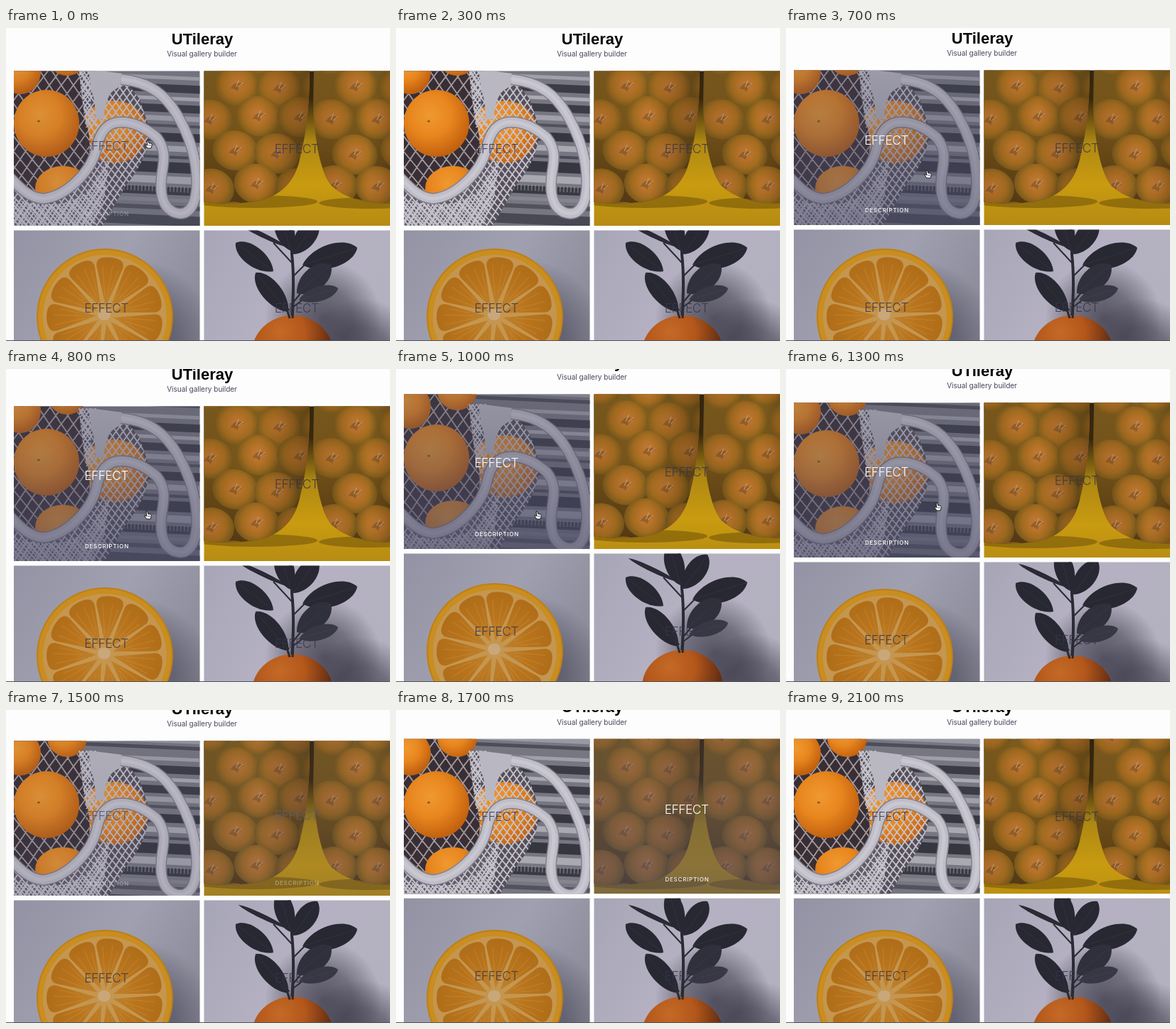
Write an HTML page with a canvas that moves like this. It is 540 px wide and 440 px high and loops after 2.2 s.

```html
<!DOCTYPE html>
<html lang="en">
<head>
<meta charset="utf-8">
<title>Visual gallery builder</title>
<style>
html, body { margin: 0; width: 100%; height: 100%; overflow: hidden; background: #fdfdfd; }
canvas { display: block; width: 540px; height: 440px; }
</style>
</head>
<body>
<canvas id="stage" width="540" height="440"></canvas>
<script>
const ctx = document.getElementById('stage').getContext('2d');
const LOOP = 2200, STEP = 100;
const W = 261.5, H = 217.5;

// Keyframe tracks: [time, value] pairs, linear in between.
const scroll = [[0, 0], [600, 0], [700, 1], [800, 8], [900, 18], [1000, 25], [1100, 23], [1200, 17], [1300, 13], [1500, 17], [1700, 19.7], [2200, 19.7]];
const drift = [[0, 0], [700, 0], [1000, -9], [1300, -1], [2200, -1]];
const hoverA = [[0, .28], [100, .1], [200, 0], [400, 0], [600, .65], [700, .85], [900, 1], [1300, .95], [1600, 0], [2200, 0]];
const hoverB = [[0, 0], [1400, 0], [1600, .7], [1700, .82], [2000, 0], [2200, 0]];
const handX = [[0, 200], [500, 199], [1000, 199], [1300, 213], [1500, 300]];
const handY = [[0, 163], [500, 180], [700, 205], [1000, 205], [1300, 193], [1500, 160]];

function at(track, t) {
  for (let i = 1; i < track.length; i++) {
    const [t0, a] = track[i - 1], [t1, b] = track[i];
    if (t <= t1) return a + (b - a) * (t - t0) / (t1 - t0);
  }
  return track[track.length - 1][1];
}

function random(seed) {
  return () => (seed = (seed * 16807) % 2147483647) / 2147483647;
}

function fill(d, color) {
  ctx.fillStyle = color;
  ctx.fill(new Path2D(d));
}

function stroke(d, color, width) {
  ctx.strokeStyle = color;
  ctx.lineWidth = width;
  ctx.stroke(new Path2D(d));
}

function oval(x, y, rx, ry, color, turn = 0) {
  ctx.fillStyle = color;
  ctx.beginPath();
  ctx.ellipse(x, y, rx, ry, turn, 0, 7);
  ctx.fill();
}

function blend(g, colors) {
  colors.forEach((c, i) => g.addColorStop(i / (colors.length - 1), c));
  return g;
}

function linear(x0, y0, x1, y1, ...colors) {
  return blend(ctx.createLinearGradient(x0, y0, x1, y1), colors);
}

function radial(x, y, r, ...colors) {
  return blend(ctx.createRadialGradient(x, y, 0, x, y, r), colors);
}

function shade(x, y, r, rgb, alpha) {
  oval(x, y, r, r, radial(x, y, r, `rgba(${rgb},${alpha})`, `rgba(${rgb},${alpha * .7})`, `rgba(${rgb},0)`));
}

function orange(x, y, rx, ry) {
  oval(x, y, rx, ry, radial(x - rx * .2, y - ry * .25, rx * 1.3, '#ef9930', '#e8861e', '#c1600f'));
}

function inside(d, draw) {
  ctx.save();
  ctx.clip(new Path2D(d));
  draw();
  ctx.restore();
}

function net(d, gap, color, width) {
  inside(d, () => {
    ctx.strokeStyle = color;
    ctx.lineWidth = width;
    ctx.beginPath();
    for (let x = -300; x < 560; x += gap) {
      ctx.moveTo(x, 20);
      ctx.quadraticCurveTo(x + 75, 150, x + 210, 290);
      ctx.moveTo(x, 20);
      ctx.quadraticCurveTo(x - 105, 150, x - 190, 290);
    }
    ctx.stroke();
  });
}

function bagPhoto() {
  ctx.fillStyle = '#777782';
  ctx.fillRect(0, 0, 280, 290);
  ctx.save();
  ctx.translate(200, 0);
  ctx.rotate(.045);
  const stripes = [[38, 8, '#9999a3'], [50, 5, '#4c4d58'], [66, 5, '#a0a0aa'], [78, 11, '#3a3b45'], [95, 5, '#aaaab4'],
    [106, 11, '#3a3b45'], [122, 7, '#a0a0aa'], [134, 4, '#50515c'], [146, 12, '#353640'], [164, 8, '#a9a9b2'],
    [178, 4, '#4a4b56'], [187, 15, '#353640'], [207, 10, '#a9a9b2'], [222, 11, '#383943'], [238, 5, '#85858f'],
    [248, 6, '#51525d'], [262, 14, '#484954']];
  for (const [y, h, c] of stripes) {
    ctx.fillStyle = c;
    ctx.fillRect(-100, y, 220, h);
  }
  ctx.fillStyle = 'rgba(195,195,205,.35)';
  for (let x = -80; x < 100; x += 5) ctx.fillRect(x, 221, 2, 8);
  ctx.restore();

  const floor = 'M0 20H105L112 110L130 160L100 230L0 240Z';
  fill(floor, '#382e35');
  net(floor, 17, '#a59b9c', 1.8);
  orange(20, 62, 29, 31);
  orange(86, 40, 28, 27);
  orange(57, 134, 46, 47);
  oval(46, 131, 2, 1.5, '#8f5a16');
  orange(80, 225, 39, 31);

  const body = 'M102 58L160 64L188 100L202 142Q200 185 168 222L132 285H0V212Q55 255 100 222Q128 180 112 130Z';
  inside(body, () => {
    ctx.fillStyle = '#55505b';
    ctx.fillRect(0, 0, 280, 290);
    orange(152, 146, 47, 44);
    fill('M0 205Q60 250 112 215L142 178L132 285H0Z', 'rgba(100,94,108,.8)');
  });
  net(body, 10, '#c6c3cc', 1.8);
  net('M102 58L130 58L119 105L130 138L112 140ZM0 236Q70 262 112 232L146 180L138 240L120 285H0Z', 6, '#c4c2cb', 1.7);

  ctx.lineCap = 'butt';
  ctx.lineJoin = 'round';
  fill('M116 58L164 64Q178 72 170 80Q156 82 147 92Q138 106 138 128L126 128Q126 102 120 88Z', '#b9b7c1');
  const strap = 'M162 72C204 76 225 96 240 121C259 153 270 190 268 226C265 257 252 265 236 259C219 251 216 231 219 207C222 187 226 172 212 154C192 137 172 130 154 133C138 137 131 151 127 171C119 202 85 237 52 240C34 239 20 226 2 206';
  stroke(strap, '#827f8c', 16);
  stroke(strap, '#bfbdc7', 13);
  stroke(strap, '#c9c7d0', 5);
}

function pineapple(outline, seed, left, right) {
  const rnd = random(seed);
  inside(outline, () => {
    ctx.fillStyle = linear(0, 20, 0, 250, '#806020', '#7b581b', '#543913');
    ctx.fillRect(270, 0, 280, 260);
    for (let row = 0; row < 6; row++) {
      for (let x = left + (row % 2) * 32; x < right + 20; x += 62) {
        const cx = x + rnd() * 8, cy = 30 + row * 47 + rnd() * 8;
        oval(cx, cy, 32, 28, radial(cx, cy - 2, 32, '#bd7c39', '#b9742a', '#a46d20', '#77591d'), .2);
        fill(`M${cx - 9} ${cy + 4}q7 -13 19 -6q-7 2 -9 10q-4 -5 -10 -4Z`, '#95602b');
        stroke(`M${cx - 1} ${cy + 1}l4 -9M${cx + 2} ${cy + 2}l7 -6`, '#c99a68', 1.3);
      }
    }
    ctx.fillStyle = linear(left, 0, right, 0, 'rgba(40,26,8,.1)', 'rgba(40,26,8,0)', 'rgba(40,26,8,.35)');
    ctx.fillRect(270, 0, 280, 260);
  });
}

function pineapplePhoto() {
  ctx.fillStyle = linear(0, 40, 0, 280, '#33240f', '#38280e', '#ae8813', '#c99b10', '#b48a13');
  ctx.fillRect(270, 0, 280, 300);
  oval(350, 244, 88, 9, 'rgba(92,65,8,.45)');
  oval(515, 246, 75, 8, 'rgba(92,65,8,.45)');
  pineapple('M270 0H425Q432 110 414 180Q404 234 350 244Q306 250 270 243Z', 17, 286, 425);
  pineapple('M434 0H550V246Q490 250 458 222Q436 195 432 110Z', 53, 458, 560);
}

function slicePhoto() {
  ctx.fillStyle = linear(0, 260, 280, 440, '#9191a3', '#a0a0b0', '#858594');
  ctx.fillRect(0, 240, 280, 220);
  shade(182, 438, 112, '66,64,80', .75);
  const x = 139, y = 406;
  oval(x, y, 96, 96, '#bd7f17');
  oval(x, y, 94, 94, '#c98d20');
  oval(x, y, 87, 87, '#c49650');
  const n = 11, a = Math.PI * 2 / n;
  for (let i = 0; i < n; i++) {
    ctx.save();
    ctx.translate(x, y - 2);
    ctx.rotate(i * a + .1);
    fill('M0 -12L18 -66Q22 -78 9 -81Q0 -83 -9 -81Q-22 -78 -18 -66Z', linear(0, -82, 0, -10, '#b06d18', '#b8741d', '#c0832f'));
    stroke('M-10 -70L-3 -28M4 -72L1 -30M12 -64L5 -36', 'rgba(210,148,65,.35)', 1.2);
    ctx.restore();
  }
  oval(x - 1, y - 3, 9, 8, '#c9a77a');
}

function leaf(x0, y0, x1, y1, fat, color = '#272832') {
  const dx = x1 - x0, dy = y1 - y0;
  const side = (k, s) => `${x0 + dx * k - dy * fat * s} ${y0 + dy * k + dx * fat * s}`;
  fill(`M${x0} ${y0}C${side(.25, .8)} ${side(.85, .8)} ${x1} ${y1}C${side(.85, -.8)} ${side(.25, -.8)} ${x0} ${y0}Z`, color);
  stroke(`M${x0} ${y0}L${x1} ${y1}`, 'rgba(78,79,94,.35)', .8);
}

function plantPhoto() {
  ctx.fillStyle = linear(278, 270, 540, 400, '#a6a5b6', '#b5b1c2', '#b3b0c0');
  ctx.fillRect(270, 240, 280, 220);
  shade(446, 408, 82, '46,44,58', .7);
  shade(500, 462, 82, '42,40,54', .7);
  stroke('M402 408Q406 355 402 318Q402 290 396 250', '#2a2b35', 4);
  stroke('M402 330L376 302M403 350L420 333M402 388L420 366M398 397L388 380M404 392L420 380', '#2a2b35', 2);
  leaf(398, 309, 327, 275, .07);
  leaf(400, 313, 384, 256, .38);
  leaf(404, 318, 438, 270, .4);
  leaf(376, 342, 323, 302, .34);
  leaf(417, 333, 494, 309, .34);
  leaf(397, 399, 351, 344, .32);
  leaf(409, 373, 457, 333, .42, '#2f303b');
  leaf(412, 382, 467, 366, .3, '#383845');
  oval(403, 456, 57, 52, radial(385, 428, 72, '#c46a26', '#b3571b', '#662e12'));
  stroke('M399 408L391 383M403 408L404 390', '#2a2b35', 3);
}

function label(text, x, y, font, color, spacing = '0px') {
  ctx.font = font;
  ctx.letterSpacing = spacing;
  ctx.fillStyle = color;
  ctx.fillText(text, x, y);
}

function tile(x, y, photo, shift, p) {
  ctx.save();
  ctx.beginPath();
  ctx.rect(x, y, W, H);
  ctx.clip();
  ctx.save();
  ctx.translate(0, shift);
  photo();
  ctx.restore();
  if (p > 0) {
    ctx.globalAlpha = p;
    ctx.fillStyle = linear(0, y, 0, y + H, 'rgba(72,72,96,.3)', 'rgba(72,72,100,.65)');
    ctx.fillRect(x, y, W, H);
    ctx.globalAlpha = 1;
  }
  const mix = Math.max(0, Math.min(1, (p - .25) / .5));
  const tone = c => Math.round(c + (255 - c) * mix);
  ctx.textAlign = 'left';
  label('EFFECT', x + 99.2, y + 115.5 - 13 * p, '300 17.3px Inter, "Open Sans", sans-serif',
    `rgba(${tone(54)},${tone(54)},${tone(76)},${.88 + .12 * mix})`, '-0.45px');
  if (p > 0) {
    label('DESCRIPTION', x + 100, y + 199 + 6 * (1 - p), '500 8px Inter, "Open Sans", sans-serif',
      `rgba(255,255,255,${Math.min(1, p * 1.1)})`, '0.75px');
  }
  ctx.restore();
}

function hand(x, y) {
  ctx.save();
  ctx.translate(x, y);
  const d = 'M-2 -5Q-1 -6 0 -4L1 -1L4 -1Q6 0 5 3L4 6H-1L-4 2Q-5 0 -3 1L-1 2Z';
  fill(d, '#fff');
  stroke(d, '#16161c', 1);
  stroke('M1 1V3M3 1V3', '#16161c', .7);
  ctx.restore();
}

function draw(t) {
  const s = at(scroll, t), shift = at(drift, t);
  ctx.fillStyle = '#fdfdfd';
  ctx.fillRect(0, 0, 540, 440);
  ctx.textAlign = 'center';
  label('UTileray', 276, 23 - s, 'bold 22px "Liberation Sans", Arial, sans-serif', '#050505');
  label('Visual gallery builder', 275.5, 40.3 - s, '400 10px Inter, "Open Sans", sans-serif', '#44445c');
  const top = 60.5 - s, low = top + 224;
  tile(11, top, bagPhoto, shift, at(hoverA, t));
  tile(278.5, top, pineapplePhoto, shift, at(hoverB, t));
  tile(11, low, slicePhoto, shift, 0);
  tile(278.5, low, plantPhoto, shift, 0);
  if (t < 200 || (t >= 500 && t <= 1400)) hand(at(handX, t), at(handY, t));
  ctx.fillStyle = '#55555c';
  ctx.fillRect(0, 439, 540, 1);
}

const start = performance.now();
let last = -1;
function frame() {
  const t = Math.floor(((performance.now() - start) % LOOP) / STEP) * STEP;
  if (t !== last) draw(last = t);
  requestAnimationFrame(frame);
}
frame();
</script>
</body>
</html>
```
